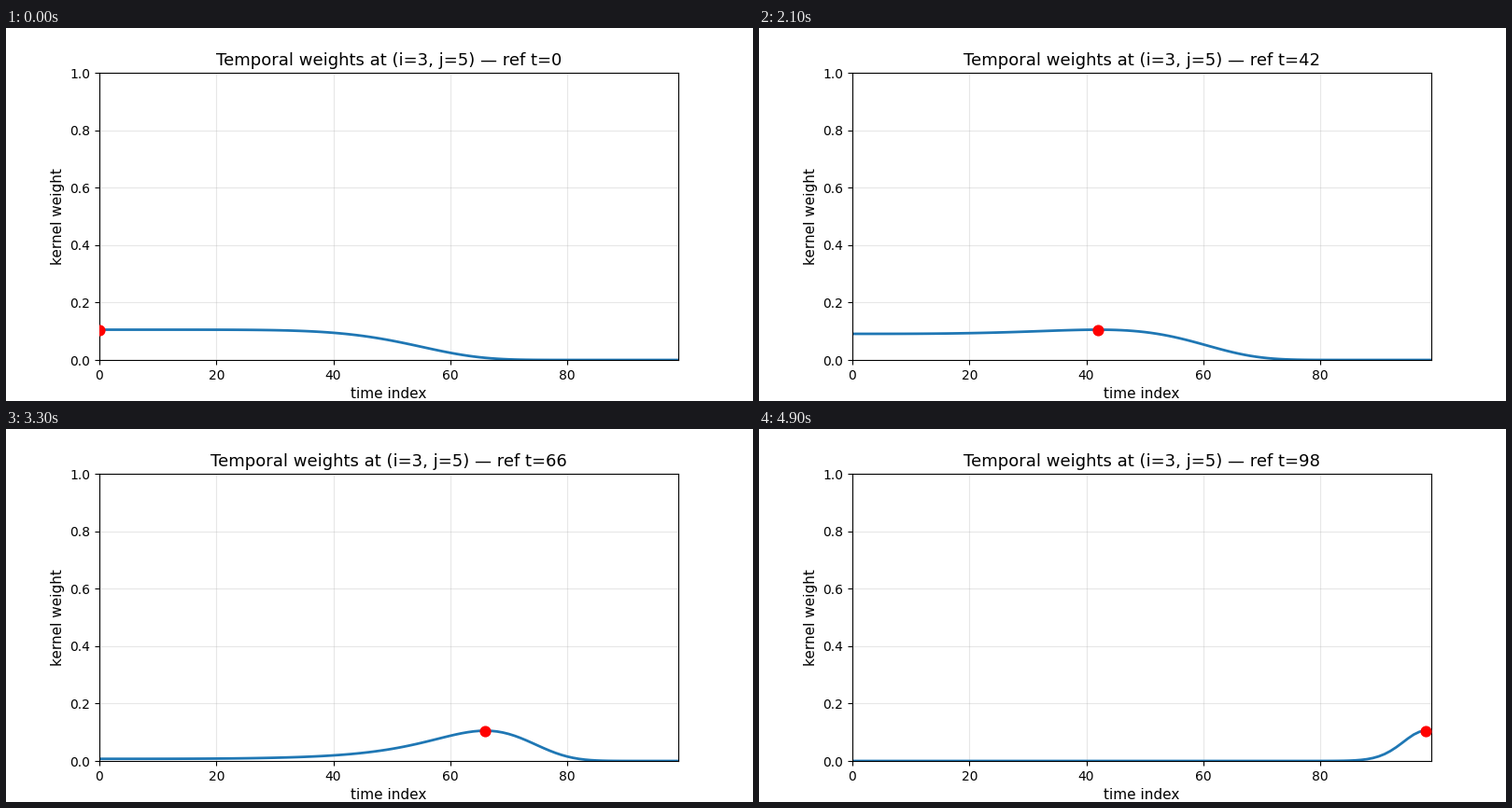
A matplotlib script that plays this animation: 800 by 400 pixels, repeating every 5 s.

```python
import numpy as np
import matplotlib.pyplot as plt
from matplotlib.animation import FuncAnimation

STEPS = 100
STRIDE = 2
PEAK = np.exp(-2.25)
time = np.arange(STEPS)


def feature(t):
    return 1.2 * (t / 60) ** 3.2


def weights(ref):
    return PEAK * np.exp(-(feature(time) - feature(ref)) ** 2)


plt.rcParams["font.family"] = "DejaVu Sans"
fig, ax = plt.subplots(figsize=(8, 4), dpi=100)
curve, = ax.plot(time, weights(0), color="tab:blue", lw=2)
marker = ax.scatter([0], [PEAK], s=60, color="red", zorder=3)
title = ax.set_title("", fontsize=13)
ax.set_xlabel("time index", fontsize=11)
ax.set_ylabel("kernel weight", fontsize=11)
ax.set_xlim(0, STEPS - 1)
ax.set_ylim(0, 1)
ax.grid(alpha=0.3)


def update(frame):
    ref = frame * STRIDE
    curve.set_ydata(weights(ref))
    marker.set_offsets([[ref, PEAK]])
    title.set_text(f"Temporal weights at (i=3, j=5) — ref t={ref}")
    return curve, marker, title


anim = FuncAnimation(fig, update, frames=STEPS // STRIDE, interval=100,
                     repeat=True, repeat_delay=0)
plt.show()
```
